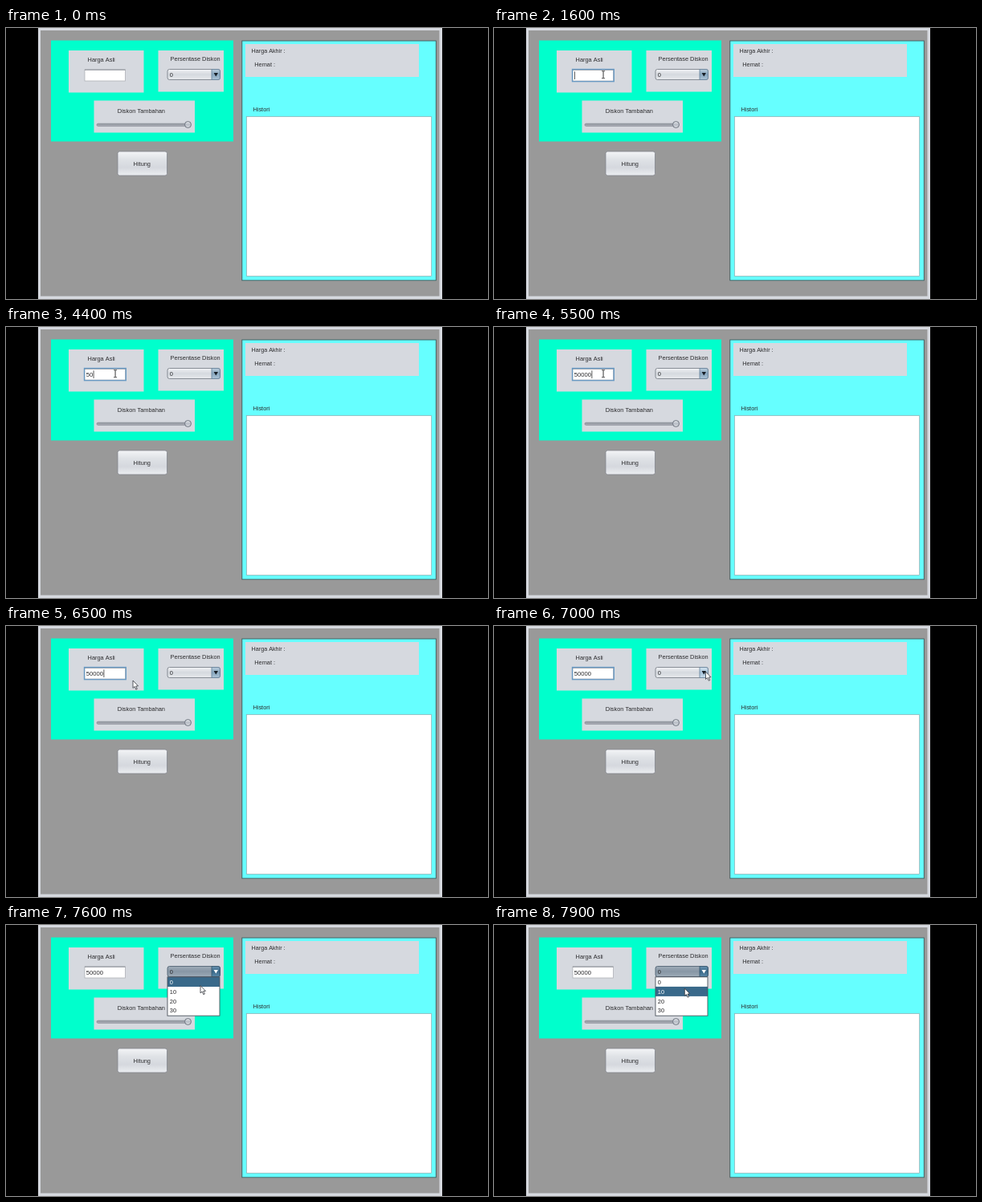
An HTML page with a canvas that plays this animation: 600x338 px, repeating every 8 s.

```html
<!DOCTYPE html>
<html lang="id">
<head>
<meta charset="utf-8">
<title>Hitung Diskon</title>
<style>
html, body { margin: 0; width: 600px; height: 338px; overflow: hidden; background: #000; }
canvas { display: block; }
</style>
</head>
<body>
<canvas id="stage" width="600" height="338"></canvas>
<script>
const ctx = document.getElementById('stage').getContext('2d');
const LOOP = 8000;
const PANEL = '#d6d9df', INK = '#2b2b2d';

// [ms, pointer x, pointer y]
const moves = [
  [6300, 136, 58], [6400, 142, 62], [6500, 158, 68], [6600, 184, 72], [6700, 214, 70],
  [6800, 240, 65], [6900, 257, 60], [7000, 263.5, 57], [7100, 264, 58], [7300, 264, 58],
  [7400, 260, 63], [7500, 250, 71], [7600, 242, 75.5], [7700, 240, 81],
  [7800, 238, 83], [7900, 237.3, 79]
];
const keyTimes = [4200, 4400, 4700, 5000, 5500];

function rect(x, y, w, h, fill) {
  ctx.fillStyle = fill;
  ctx.fillRect(x, y, w, h);
}

function outline(x, y, w, h, color, width = 1) {
  ctx.strokeStyle = color;
  ctx.lineWidth = width;
  ctx.strokeRect(x, y, w, h);
}

function round(x, y, w, h, r, fill, stroke) {
  ctx.beginPath();
  ctx.roundRect(x, y, w, h, r);
  ctx.fillStyle = fill;
  ctx.fill();
  if (!stroke) return;
  ctx.strokeStyle = stroke;
  ctx.lineWidth = 0.8;
  ctx.stroke();
}

function shade(y0, y1, ...colors) {
  const g = ctx.createLinearGradient(0, y0, 0, y1);
  colors.forEach((c, i) => g.addColorStop(i / (colors.length - 1), c));
  return g;
}

function text(s, x, y, size = 7.4, color = INK) {
  ctx.font = `${size}px "Liberation Sans", Arial, sans-serif`;
  ctx.fillStyle = color;
  ctx.fillText(s, x, y);
}

function path(points, fill, stroke) {
  ctx.beginPath();
  points.forEach(([x, y]) => ctx.lineTo(x, y));
  ctx.closePath();
  ctx.fillStyle = fill;
  ctx.fill();
  if (stroke) {
    ctx.strokeStyle = stroke;
    ctx.lineWidth = 0.8;
    ctx.stroke();
  }
}

function drawWindow() {
  rect(0, 0, 600, 338, '#000');
  rect(40, 0, 503, 338, PANEL);
  rect(43, 3, 496.5, 331.5, '#999');
  rect(56, 15.5, 227, 126, '#00ffcc');
  rect(78, 28, 93.5, 52.5, PANEL);
  rect(189.5, 28, 81.5, 51.5, PANEL);
  rect(109.5, 90.5, 125.5, 40, PANEL);

  rect(294, 16, 241, 299, '#66ffff');
  outline(293.8, 16, 241.5, 298.8, '#3c5c5e', 0.9);
  rect(298, 20, 216, 41, PANEL);
  rect(299.5, 110.5, 230.5, 199, '#fff');
  outline(299.5, 110.5, 230, 199, '#8fb5b8', 0.8);

  text('Harga Asli', 101.6, 42);
  text('Persentase Diskon', 204.6, 41.3);
  text('Diskon Tambahan', 138.8, 105.6);
  text('Harga Akhir :', 305.6, 31.3, 7.2);
  text('Hemat :', 309.2, 47.6);
  text('Histori', 307.4, 103.8);

  round(139, 154, 61.5, 30, 2.5, shade(154, 184, '#f4f5f7', '#dfe2e6', '#d5d8de', '#eceef1'), '#83878e');
  text('Hitung', 158.6, 171.6);
}

function drawSlider() {
  round(113, 119.2, 115, 3.2, 1.6, shade(119, 122.5, '#868b94', '#b4b8c0'), '#8d929b');
  ctx.beginPath();
  ctx.arc(226.5, 120.5, 4, 0, 2 * Math.PI);
  ctx.fillStyle = shade(116, 125, '#eceef1', '#b9bec7', '#dfe2e6');
  ctx.fill();
  ctx.strokeStyle = '#646b77';
  ctx.lineWidth = 0.9;
  ctx.stroke();
}

function drawField(t) {
  const focused = t >= 1600 && t < 7100;
  rect(98, 52, 50.5, 14, '#fff');
  outline(98, 52, 50.5, 14, '#a5a9b0', 0.7);
  rect(98, 51.7, 50.5, 0.8, '#777b82');
  if (focused) outline(97.5, 51.5, 51.8, 15.2, '#6699c4', 1.3);

  const typed = keyTimes.filter(k => t >= k).length;
  text('50000'.slice(0, typed), 99.8, 61.7, 7.6);

  // Every key press restarts the caret blink
  const since = t - (typed ? keyTimes[typed - 1] : 1600);
  if (focused && Math.floor(since / 500) % 2 === 0)
    rect(100.1 + typed * 4.28, 54.3, 0.8, 9.7, '#333');
}

function drawCombo(t) {
  const open = t >= 7100, hover = t >= 7000;
  const body = open ? shade(51, 65, '#a0adb9', '#8796a5', '#9eacb8')
                    : shade(51, 65, '#f3f4f6', '#d5d9df', '#e8eaed');
  const button = open ? shade(51, 65, '#6c95b2', '#39698a', '#5d8bab')
    : hover ? shade(51, 65, '#d7e5f0', '#a4c2d9', '#cbddeb')
    : shade(51, 65, '#bdcfde', '#87a6be', '#afc6d8');
  round(201, 51.5, 65.5, 13, 2.5, body, open ? '#46586a' : '#70767f');
  round(256, 51.5, 10.5, 13, [0, 2.5, 2.5, 0], button, open ? '#34536b' : '#64809a');
  path([[258.6, 56], [264, 56], [261.3, 60.6]], open ? '#fff' : '#161d24');
  text('0', 203.8, 61.2);
}

function drawList(y) {
  const selected = y > 77 ? 1 : 0;
  rect(201, 65, 65, 48.3, '#fff');
  rect(201, 65 + selected * 11.9, 65, 12, '#39698a');
  outline(201, 64.8, 65, 48.4, '#4b535c', 0.9);
  ['0', '10', '20', '30'].forEach((s, i) =>
    text(s, 203.8, 74 + i * 11.8, 7.4, i === selected ? '#fff' : INK));
}

function pointerAt(t) {
  const i = moves.findIndex(m => m[0] > t);
  if (i === 0) return [136, 58];
  if (i < 0) return moves[moves.length - 1].slice(1);
  const a = moves[i - 1], b = moves[i];
  const k = (t - a[0]) / (b[0] - a[0]);
  return [a[1] + (b[1] - a[1]) * k, a[2] + (b[2] - a[2]) * k];
}

function drawPointer(t, x, y) {
  if (t < 1600) return;
  if (x < 149 && y < 67) {
    rect(x - 0.4, y - 4, 0.9, 8.6, '#222');
    rect(x - 2, y - 4.6, 4.1, 0.8, '#333');
    rect(x - 2, y + 4.4, 4.1, 0.8, '#333');
    return;
  }
  const arrow = [[0, 0], [0, 9.4], [2.1, 7.5], [3.8, 11.2], [5.3, 10.5], [3.7, 7], [6.5, 6.8]];
  path(arrow.map(([dx, dy]) => [x + dx, y + dy]), '#fff', '#30343a');
}

function frame(now) {
  const t = Math.floor((now % LOOP) / 100) * 100;
  const [x, y] = pointerAt(t);
  drawWindow();
  drawSlider();
  drawField(t);
  drawCombo(t);
  if (t >= 7100) drawList(y);
  drawPointer(t, x, y);
  requestAnimationFrame(frame);
}
requestAnimationFrame(frame);
</script>
</body>
</html>
```
